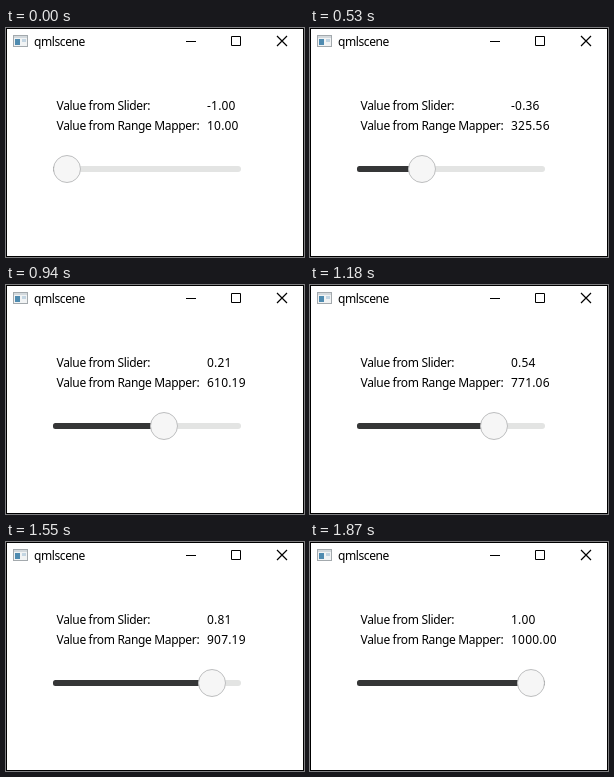
Recreate the animation shown at these times as an HTML page. Size 298 by 229 pixels, loop 2480 ms.

```html
<!DOCTYPE html>
<html lang="en">
<head>
<meta charset="utf-8">
<title>Slider and range mapper</title>
<style>
  html, body { margin: 0; width: 100%; height: 100%; overflow: hidden; background: #fff; }
  svg { display: block; width: 298px; height: 229px; }
  text { font: 12px "Noto Sans", "Open Sans", sans-serif; fill: #000; white-space: pre; }
  .label { letter-spacing: -0.33px; }
  .value { letter-spacing: 0.2px; }
  .title { letter-spacing: -0.4px; }
  .line { fill: none; stroke: #000; }
</style>
</head>
<body>
<svg viewBox="0 0 298 229">
  <rect class="line" x=".5" y=".5" width="297" height="228"/>

  <g id="icon">
    <rect x="7.5" y="7.5" width="14" height="11" fill="#f1f3f4" stroke="#a3a9ad"/>
    <rect x="8" y="8" width="13" height="2" fill="#d3d9dd"/>
    <rect x="9" y="11" width="5" height="6" fill="#4f8bb0"/>
    <rect x="16" y="11" width="4" height="3" fill="#c3d5e2"/>
  </g>
  <text class="title" x="28" y="18">qmlscene</text>
  <path class="line" d="M180 13.5h10M225.5 8.5h9v9h-9z"/>
  <path class="line" stroke-width="1.2" d="M271 8l10 10M281 8l-10 10"/>

  <text class="label" x="50.5" y="82">Value from Slider:</text>
  <text class="label" x="50.5" y="102">Value from Range Mapper:</text>
  <text class="value" id="sliderValue" x="201" y="82"></text>
  <text class="value" id="mappedValue" x="201" y="102"></text>

  <rect x="47" y="138" width="188" height="6" rx="3" fill="#e3e4e3"/>
  <rect id="fill" x="47" y="138" height="6" rx="2.5" fill="#353637"/>
  <circle id="handle" cy="141" r="13.5" fill="#f6f6f6" stroke="#bdbebf"/>
</svg>
<script>
  const LOOP = 2480, TRAVEL = 160, START = 61;
  const FIRST_STEP = 137, STEP = 78.5;
  // the drag's changes of speed: [step, handle offset in px]
  const drag = [[0, 0], [2, 18], [6, 51], [7, 66], [9, 79], [14, 123], [19, 145], [21, 154], [23, TRAVEL]];
  const [fill, handle, sliderValue, mappedValue] =
    ["fill", "handle", "sliderValue", "mappedValue"].map(id => document.getElementById(id));

  function offsetAt(time) {
    const step = Math.max(0, Math.floor((time - FIRST_STEP) / STEP) + 1);
    const next = drag.findIndex(([key]) => key > step);
    if (next < 0) return TRAVEL;
    const [[s0, x0], [s1, x1]] = drag.slice(next - 1, next + 1);
    return Math.round(x0 + (x1 - x0) * (step - s0) / (s1 - s0));
  }

  function render(time) {
    const offset = offsetAt(time);
    const ratio = offset / TRAVEL;
    handle.setAttribute("cx", START + offset);
    fill.setAttribute("width", 6 + ratio * 182);
    sliderValue.textContent = (2 * ratio - 1).toFixed(2);
    // the tiny bias rounds exact halves down
    mappedValue.textContent = (10 + 990 * ratio - 1e-6).toFixed(2);
  }

  let origin;
  function tick(now) {
    origin ??= now;
    render((now - origin) % LOOP);
    requestAnimationFrame(tick);
  }
  render(0);
  requestAnimationFrame(tick);
</script>
</body>
</html>
```
